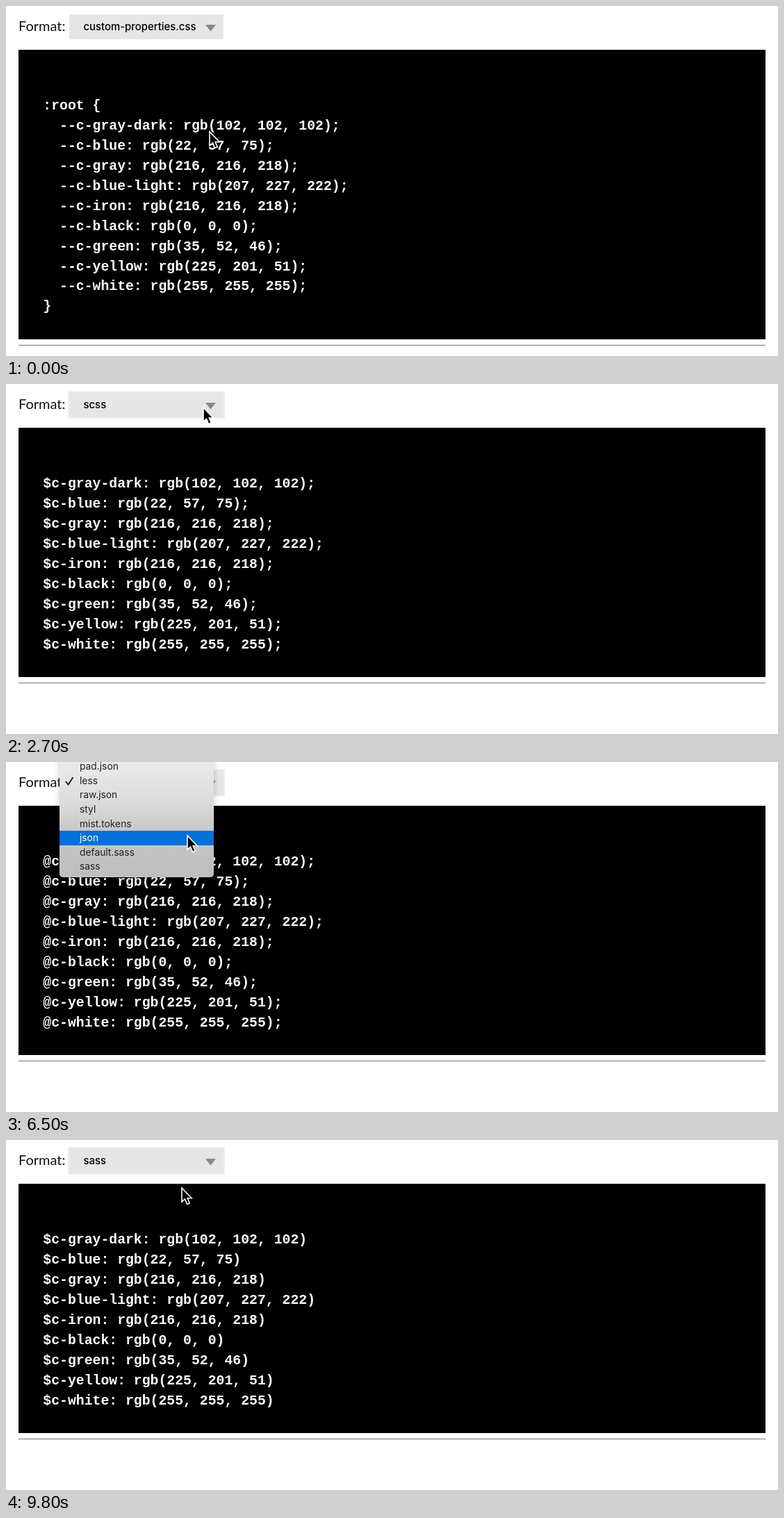
Recreate the animation shown at these times as an HTML page. Size 1111x504 px, loop 9900 ms.

```html
<!DOCTYPE html>
<html>
<head>
<meta charset="utf-8">
<style>
  html, body { margin: 0; width: 100%; height: 100%; overflow: hidden; background: #fff; }
  #stage { position: relative; width: 1111px; height: 504px; overflow: hidden; }
  #stage > * { position: absolute; margin: 0; }
  #label { left: 18px; top: 16px; font: 20px/24px Lato, sans-serif; color: #111; }
  #select { left: 91px; top: 12px; width: 222px; height: 36px; background: #e6e6e6; }
  #value { position: absolute; left: 20.5px; font: 500 14.9px/37px Inter, sans-serif; color: #000; }
  #select svg { position: absolute; left: 196px; top: 15px; }
  #panel { left: 18px; top: 63px; width: 1075px; background: #000; }
  #rule { left: 18px; width: 1075px; height: 1px; background: #77717a; }
  #code { left: 53.3px; color: #fff; font: bold 19.8px/28.9px "Liberation Mono", monospace; }
  #menu { left: 77px; width: 222px; padding: 5px 0; border-radius: 5px;
          box-shadow: 0 3px 10px rgba(0, 0, 0, .2); font: 13.8px/20.65px Inter, sans-serif; color: #222; }
  #menu div { position: relative; height: 20.65px; padding-left: 29px; white-space: pre; }
  #menu .hover { background: #0470d9; color: #fff; }
  #menu svg { position: absolute; left: 8px; top: 4px; }
  #cursor { left: 0; top: 0; overflow: visible; }
</style>
</head>
<body>
<div id="stage">
  <div id="label">Format:</div>
  <div id="select"><span id="value"></span>
    <svg width="15" height="10"><path d="M0 0H15L7.5 9.5Z" fill="#888"/></svg>
  </div>
  <div id="panel"></div>
  <pre id="code"></pre>
  <div id="rule"></div>
  <div id="menu"></div>
  <svg id="cursor" width="18" height="26">
    <path d="M0 0V20L4.5 16L7.6 23.5L11.2 22L8.2 14.8H14.2Z" fill="#000" stroke="#fff" stroke-width="1.6"/>
  </svg>
</div>
<script>
const $ = id => document.getElementById(id);
const LOOP = 9900, STEP = 100, ROW = 20.65, LINE = 28.9, PANEL_TOP = 63;

const formats = ['custom-properties.css', 'cssmodules.css', 'scss', 'default.scss', 'map.scss',
  'map.variables.scss', 'list.scss', 'common.js', 'module.js', 'handset.xml', 'pad.json', 'less',
  'raw.json', 'styl', 'mist.tokens', 'json', 'default.sass', 'sass'];

const colors = Object.entries({
  'gray-dark': '102, 102, 102', blue: '22, 57, 75', gray: '216, 216, 218',
  'blue-light': '207, 227, 222', iron: '216, 216, 218', black: '0, 0, 0',
  green: '35, 52, 46', yellow: '225, 201, 51', white: '255, 255, 255'
});
const list = (prefix, end) => colors.map(([name, rgb]) => `${prefix}c-${name}: rgb(${rgb})${end}`);
const json = colors.map(([name, rgb]) => `  "c-${name.replace('-', '--')}": "rgb(${rgb})"`).join(',\n');

const code = {
  0: [':root {', ...list('  --', ';'), '}'],
  2: list('$', ';'),
  11: list('@', ';'),
  15: ['{', ...json.split('\n'), '}'],
  17: list('$', '')
};

// Each visit to the menu: open time, close time, format before, format after
const visits = [[800, 1900, 0, 2], [2900, 4100, 2, 11], [5200, 6900, 11, 15], [7800, 8900, 15, 17]];
const CODE_DELAY = 200;

// Pointer tip: time, x, y
const path = [[0, 293, 181], [600, 288, 36], [900, 288, 36], [1400, 272, 65], [2100, 272, 65],
  [2600, 284, 34], [2900, 284, 34], [3400, 271, 206], [4200, 271, 206], [4600, 293, 60],
  [4900, 290, 34], [5200, 290, 34], [6200, 261, 106], [7000, 261, 106], [7500, 275, 34],
  [7800, 275, 34], [8200, 255, 79], [8500, 253, 69], [LOOP, 253, 69]];

function pointerAt(t) {
  const i = path.findIndex(p => p[0] > t);
  const [t0, x0, y0] = path[i - 1], [t1, x1, y1] = path[i];
  const u = (t - t0) / (t1 - t0), k = u * u * (3 - 2 * u);
  return [x0 + (x1 - x0) * k, y0 + (y1 - y0) * k];
}

const chosenAt = t => visits.reduce((chosen, v) => t >= v[1] ? v[3] : chosen, 0);

function drawMenu(selected, y) {
  const top = 27 - ROW / 2 - 5 - selected * ROW;
  const hover = Math.floor((y - top - 5) / ROW);
  const height = formats.length * ROW + 10;
  const stops = top + height < 100
    ? [['#eeeeee', 0], ['#e4e4e4', 84]]
    : [['#ebebeb', 0], ['#dcdcdc', 55], ['#c8c8c8', 97], ['#bfbfbf', 150]];
  const tick = '<svg width="13" height="13"><path d="M1 7L4.5 11.5L11.5 1" fill="none" ' +
    'stroke="currentColor" stroke-width="2"/></svg>';
  $('menu').style.top = top + 'px';
  $('menu').style.background = `linear-gradient(${stops.map(([c, at]) => `${c} ${at - top}px`)})`;
  $('menu').innerHTML = formats.map((name, i) =>
    `<div class="${i === hover ? 'hover' : ''}">${i === selected ? tick : ''}${name}</div>`).join('');
}

function draw(t) {
  const [x, y] = pointerAt(t);
  const open = visits.find(v => t >= v[0] && t < v[1]);
  const shown = chosenAt(t - CODE_DELAY), lines = code[shown];
  const firstLine = 144.7 - (shown === 15 ? LINE : 0);
  const bottom = Math.round(firstLine + (lines.length - 1) * LINE + 46.5);

  $('value').textContent = formats[chosenAt(t)];
  $('select').style.boxShadow = t >= visits[0][0] ? '0 0 0 2px #f0f0f0' : 'none';
  $('code').textContent = lines.join('\n');
  $('code').style.top = firstLine - LINE / 2 + 'px';
  $('panel').style.height = bottom - PANEL_TOP + 'px';
  $('rule').style.top = bottom + 8 + 'px';
  $('menu').style.display = open ? 'block' : 'none';
  if (open) drawMenu(open[2], y);
  $('cursor').style.transform = `translate(${x}px, ${y}px)`;
}

let last = -1;
function tick() {
  const t = Math.floor(performance.now() % LOOP / STEP) * STEP;
  if (t !== last) draw(last = t);
  requestAnimationFrame(tick);
}
tick();
</script>
</body>
</html>
```
